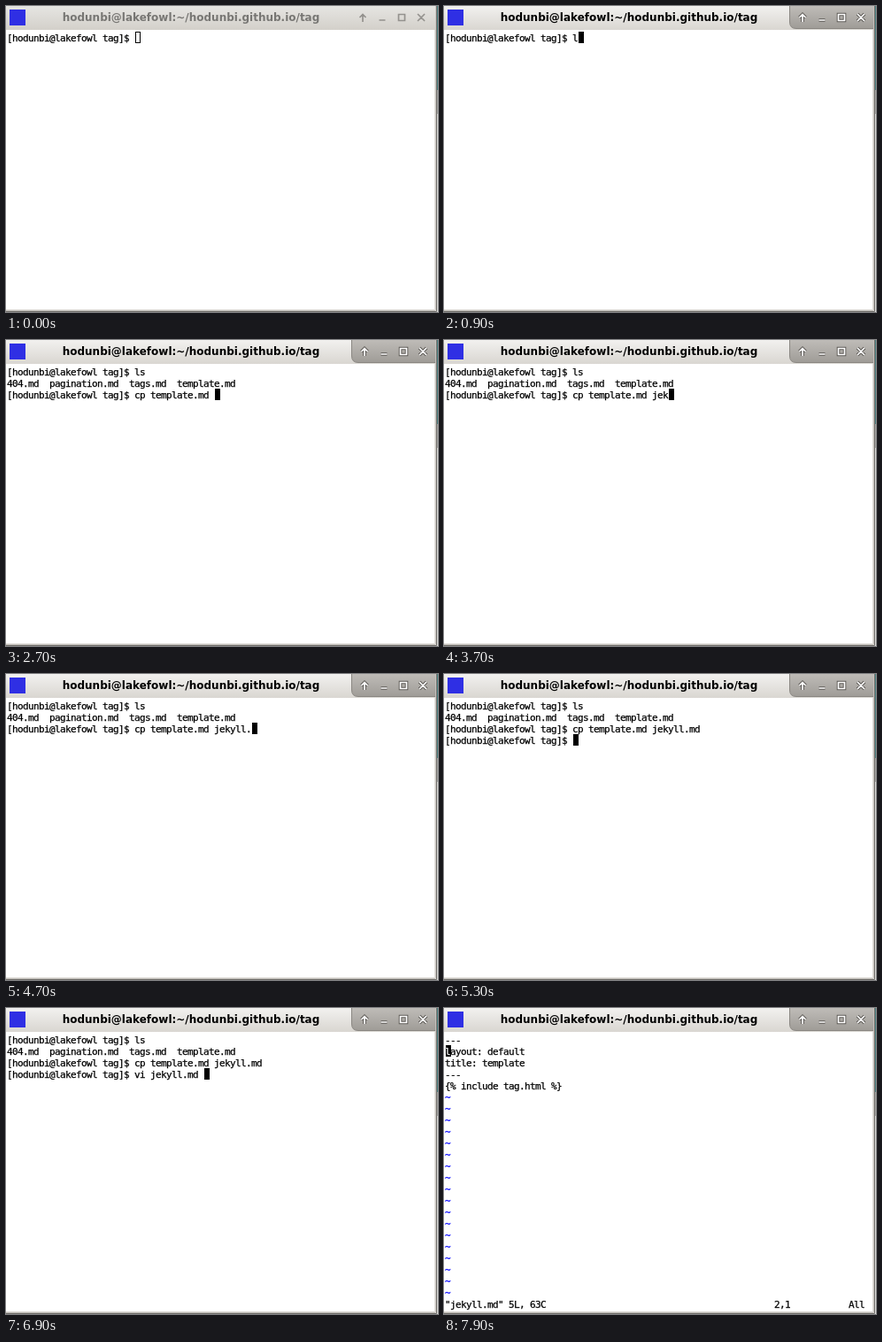
These frames come from a looping animation (488x346 px, 8000 ms). An HTML page:

```html
<!DOCTYPE html>
<html lang="en">
<head>
<meta charset="utf-8">
<title>Terminal</title>
<style>
html, body { margin: 0; width: 100%; height: 100%; overflow: hidden; }
body { position: relative; background: #fff; }
svg, pre, #cursor { position: absolute; margin: 0; }
svg { left: 0; top: 0; }
pre, #cursor {
  font: 11px/13px "DejaVu Sans Mono", monospace;
  letter-spacing: calc(6px - 1ch);
  -webkit-text-stroke: .25px;
  color: #000;
}
pre { left: 1px; top: 30px; }
pre i { font-style: normal; color: #00f; }
#cursor {
  box-sizing: border-box; width: 6px; height: 13px; padding-top: 1px;
  background: #000; color: #fff; white-space: pre; text-indent: -1px;
}
.idle #cursor { background: #fff; border: 1px solid #000; }
#title { font: bold 12px "DejaVu Sans", sans-serif; text-anchor: middle; fill: #000; }
#icons { fill: none; transform: translate(2px, 0); }
#icons .rim { stroke: #5a5753; stroke-width: 3.6; }
#icons .ink { stroke: #fff; stroke-width: 1.7; }
.idle #title { fill: #777673; }
.idle #bar { fill: url(#dim); }
.idle #panel, .idle .rim { display: none; }
.idle #icons { transform: none; }
.idle #icons .ink { stroke: #94928e; }
</style>
</head>
<body class="idle">
<svg width="488" height="346" viewBox="0 0 488 346">
  <defs>
    <linearGradient id="lit" x2="0" y2="1">
      <stop stop-color="#f2f1ef"/><stop offset="1" stop-color="#d9d6d1"/>
    </linearGradient>
    <linearGradient id="dim" x2="0" y2="1">
      <stop stop-color="#e6e5e2"/><stop offset="1" stop-color="#d3d0ca"/>
    </linearGradient>
    <linearGradient id="dark" x2="0" y2="1">
      <stop stop-color="#c0bdb9"/><stop offset="1" stop-color="#9f9c97"/>
    </linearGradient>
    <path id="glyphs" d="M403 18V10M399.5 13L403 9.5L406.5 13M421.5 16H428.5M443.5 9.5H450.5V16.500H443.5ZM465 9L473 17M473 9L465 17"/>
  </defs>
  <rect id="bar" width="486" height="27" fill="url(#lit)"/>
  <path id="panel" d="M390.5 -1V18Q390.5 25.5 398 25.5H487V-1Z" fill="url(#dark)" stroke="#8a8782"/>
  <rect x="4" y="4" width="18" height="18" fill="#2f2fe4"/>
  <text id="title" x="209" y="17"></text>
  <g id="icons">
    <use href="#glyphs" class="rim"/>
    <use href="#glyphs" class="ink"/>
  </g>
  <path d="M484.5 27V343.5H0" fill="none" stroke="#dddad6"/>
  <path d="M485.5 0V344.5H0" fill="none" stroke="#c3c0bb"/>
  <path d="M486.5 0V345.5H0" fill="none" stroke="#6f6d6a"/>
  <path d="M487.5 0V95" stroke="#4f8586"/>
  <path d="M487.5 95V122" stroke="#a9a9a7"/>
  <path d="M487.5 122V346" stroke="#e2e2e0"/>
</svg>
<pre id="screen"></pre>
<div id="cursor"></div>
<script>
const user = 'hodunbi', host = 'lakefowl';
const prompt = `[${user}@${host} tag]$ `;
const focusAt = 100, editAt = 7200, downAt = 7900, loop = 8000;

// [time, text added to the shell]
const log = [
  [0, prompt],
  [900, 'l'], [1100, 's'],
  [1300, '\n404.md  pagination.md  tags.md  template.md\n' + prompt],
  [1900, 'c'], [2000, 'p '], [2400, 't'], [2600, 'e'], [2700, 'mplate.md '],
  [3300, 'j'], [3500, 'e'], [3700, 'k'], [3900, 'y'], [4100, 'l'], [4200, 'l'],
  [4700, '.'], [4900, 'm'], [5100, 'd'],
  [5300, '\n' + prompt],
  [6400, 'v'], [6500, 'i'], [6600, ' '], [6800, 'j'], [6900, 'ekyll.md '],
];
const file = ['---', 'layout: default', 'title: template', '---', '{% include tag.html %}'];

const $ = id => document.getElementById(id);
$('title').textContent = `${user}@${host}:~/${user}.github.io/tag`;

function shell(t) {
  const text = log.filter(([at]) => at <= t).map(e => e[1]).join('');
  const lines = text.split('\n');
  return { lines, row: lines.length - 1, col: lines.at(-1).length };
}

function editor(t) {
  const row = t < downAt ? 0 : 1;
  const status = '"jekyll.md" 5L, 63C'.padEnd(62) + `${row + 1},1`.padEnd(14) + 'All';
  return { lines: [...file, ...Array(18).fill('~'), status], row, col: 0 };
}

let shown;
function draw() {
  const t = performance.now() % loop;
  const { lines, row, col } = t < editAt ? shell(t) : editor(t);
  document.body.className = t < focusAt ? 'idle' : '';
  const html = lines.join('\n').replace(/^~$/gm, '<i>~</i>');
  if (html !== shown) $('screen').innerHTML = shown = html;
  const cursor = $('cursor');
  cursor.textContent = lines[row][col] || '';
  cursor.style.left = 2 + 6 * col + 'px';
  cursor.style.top = 29 + 13 * row + 'px';
  requestAnimationFrame(draw);
}
draw();
</script>
</body>
</html>
```
